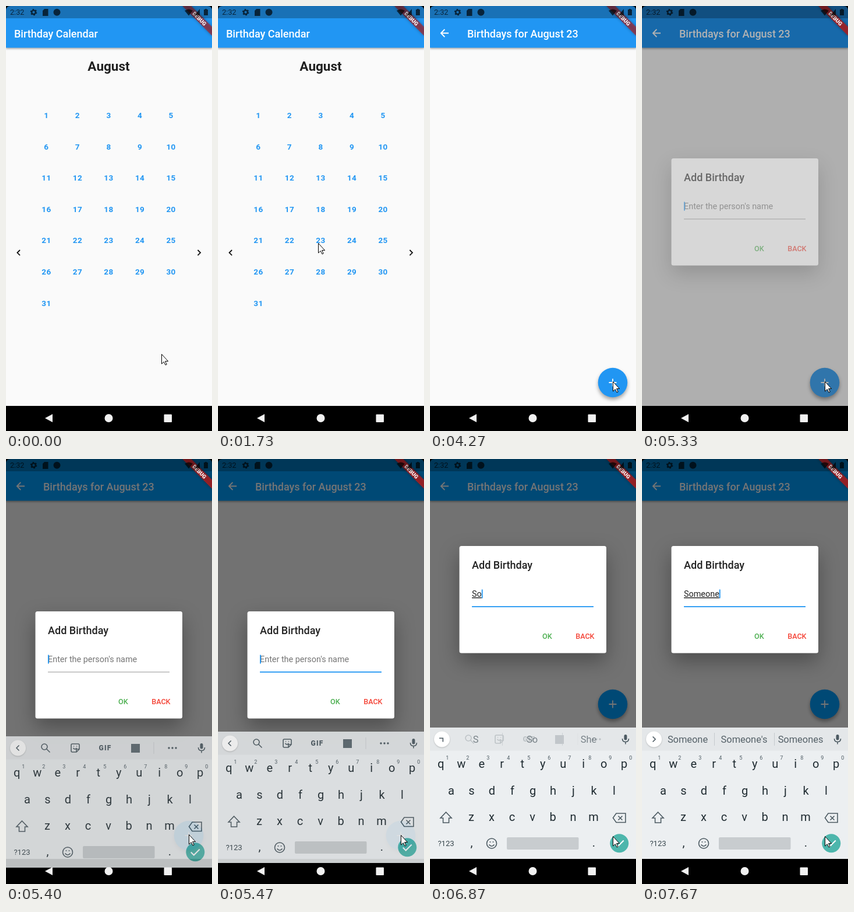
Animation of 354 by 728 pixels, one loop 8 s. Source, as an HTML page:

```html
<!DOCTYPE html>
<html lang="en">
<head>
<meta charset="utf-8">
<title>Birthday Calendar</title>
<style>
  html, body { margin: 0; width: 100%; height: 100%; overflow: hidden; background: #000; }
  svg { display: block; width: 100%; height: 100%; font-family: Roboto, sans-serif; }
  .mid { text-anchor: middle; }
  .title { font-size: 18px; font-weight: 500; }
  .button { font-size: 12.6px; font-weight: 500; }
  .line { fill: none; stroke-width: 1.8; }
  #days { font-size: 13.5px; font-weight: 700; letter-spacing: .4px; fill: #2196f3; }
  #fab { filter: drop-shadow(0 4px 3px rgba(0,0,0,.35)); }
  #dialog { filter: drop-shadow(0 14px 17px rgba(0,0,0,.32)); }
  #typed { text-decoration: underline 1px #777; text-underline-offset: 1.5px; }
  #keys { font-size: 20px; fill: #1f2b31; }
  #keyboard .line { stroke: #4c5a62; stroke-width: 1.6; }
  #words { font-size: 16.4px; fill: #556168; }
  .bar { filter: drop-shadow(0 2px 1.5px rgba(0,0,0,.3)); }
</style>
</head>
<body>
<svg viewBox="0 0 354 728">
  <defs><clipPath id="fabClip"><circle cx="314" cy="645" r="25.3"/></clipPath></defs>

  <g id="calendar">
    <rect width="354" height="685" fill="#fafafa"/>
    <rect class="bar" width="354" height="71.5" fill="#2196f3"/>
    <text class="title" x="14" y="53.5" fill="#fff">Birthday Calendar</text>
    <text class="mid" x="176.5" y="110.5" font-size="22.5" font-weight="700" fill="#212121">August</text>
    <g id="days" class="mid"></g>
    <path class="line" stroke="#111" d="M24 418l-4.6 4.6 4.6 4.6M329.5 418l4.6 4.6-4.6 4.6"/>
  </g>

  <g id="birthdays">
    <rect width="354" height="685" fill="#fafafa"/>
    <rect class="bar" width="354" height="71.5" fill="currentColor"/>
    <path class="line" stroke="#fff" d="M32 46.500H19M25.300 40l-6.500 6.500 6.500 6.500"/>
    <text class="title" x="64" y="53.5" fill="#fff">Birthdays for August 23</text>
    <g id="fab">
      <circle cx="314" cy="645" r="25.3" fill="currentColor"/>
      <circle id="splash" cx="314" cy="645" fill="#fff" fill-opacity=".16" clip-path="url(#fabClip)"/>
      <path class="line" stroke="#fff" d="M307.500 645h13M314 638.500v13"/>
    </g>
  </g>

  <rect id="dim" width="354" height="685"/>

  <g id="dialog">
    <rect x="50.5" y="149" width="252.500" height="183.500" rx="3.500" fill="#fff"/>
    <text class="title" x="72" y="188" fill="#212121">Add Birthday</text>
    <text id="hint" x="72" y="236" font-size="14.4" fill="#757575">Enter the person's name</text>
    <text id="typed" x="72" y="236" font-size="14.4" fill="#212121"></text>
    <rect id="caret" y="223.500" width="1.8" height="15" fill="#2196f3"/>
    <rect id="underline" x="72" y="252" width="209" height="1.8"/>
    <text class="button" x="193" y="307.500" fill="#4caf50">OK</text>
    <text class="button" x="250.200" y="307.500" fill="#f44336">BACK</text>
  </g>

  <g transform="translate(354) rotate(45)">
    <rect id="ribbon" x="-36" y="25.200" width="72" height="10.800" fill="#b71c1c"
      style="filter:drop-shadow(0 0 2.500px rgba(0,0,0,.5))"/>
    <text class="mid" y="33.900" font-size="9.2" font-weight="900" fill="#fff">DEBUG</text>
  </g>

  <g>
    <rect width="354" height="21" fill-opacity=".25"/>
    <g fill-opacity=".68">
      <text x="7" y="15" font-size="12.6">2:32</text>
      <path d="M66 5h6.500v12h-9.500v-9zM307 8q7-5 14 0l-7 8.500zM333 5v11h-9zM340 6h2v-1h3v1h2v10h-7z"/>
    </g>
    <g fill="none" stroke="#000" stroke-opacity=".68">
      <circle cx="47.500" cy="10.700" r="3.300" stroke-width="2.400"/>
      <circle cx="47.500" cy="10.700" r="5" stroke-width="1.600" stroke-dasharray="2.600 2.636"/>
    </g>
    <circle cx="87.500" cy="10.700" r="6" fill-opacity=".68"/>
  </g>

  <rect y="685" width="354" height="43"/>
  <path d="M0 0h8q-8 0-8 8zM354 0h-8q8 0 8 8z"/>
  <g fill="#f1f1f1">
    <path d="M67 706l13-7v14z"/>
    <circle cx="176.500" cy="706" r="7"/>
    <rect x="271.500" y="699.500" width="13.500" height="13.500" rx="1"/>
  </g>

  <g id="keyboard">
    <rect y="460" width="354" height="225" fill="#eceff1"/>
    <rect y="460" width="354" height="39.500" fill="#e4e7e9"/>
    <circle cx="20.500" cy="480" r="13.500" fill="#fff" style="filter:drop-shadow(0 1px 1px rgba(0,0,0,.2))"/>
    <path id="chevron" class="line" d="M22.500 475.500l-4.500 4.500 4.500 4.500"/>
    <g id="tools">
      <g class="line">
        <circle cx="66" cy="478" r="5"/>
        <path d="M69.500 481.500l6 6M114 473h10q2 0 2 2v7l-5 5h-7q-2 0-2-2v-10q0-2 2-2zM126 482h-5v5M115.500 480q3 4 6 0M116 477h1M121 477h1"/>
      </g>
      <text class="mid" x="170.500" y="484" font-size="12" font-weight="900" letter-spacing="1.2" fill="#4c5a62">GIF</text>
      <rect x="215" y="473" width="15" height="15" fill="#5b686f"/>
      <rect x="253.500" y="470" width="1" height="20" fill="#cbd0d3"/>
      <path d="M280 480h.01M286 480h.01M292 480h.01" stroke="#4c5a62" stroke-width="3.500" stroke-linecap="round"/>
    </g>
    <g id="words" class="mid">
      <text x="78.500" y="486"></text><text x="175.500" y="486"></text><text x="272.500" y="486"></text>
      <path d="M124.500 469v22M227.500 469v22" stroke="#c5cacd"/>
    </g>
    <rect x="333.500" y="472" width="5" height="9.500" rx="2.500" fill="#4c5a62"/>
    <path class="line" d="M330.500 479q0 5.500 5.500 5.500t5.500-5.500M336 484.500v4"/>
    <g id="keys" class="mid"></g>
    <path id="shift" class="line" d="M27.500 605l9.500 10h-4.500v8h-10v-8h-4.500z"/>
    <path class="line" d="M320 607h16v15.500h-16l-5.500-7.750zM323.500 611.500l7 7M330.500 611.500l-7 7"/>
    <text class="mid" x="27.500" y="663" font-size="13" fill="#37454c">?123</text>
    <g class="mid" font-size="20" fill="#1f2b31"><text x="71.500" y="664">,</text><text x="281.500" y="664">.</text></g>
    <circle class="line" cx="106" cy="658.500" r="8.500"/>
    <path class="line" d="M101.500 660.500q4.500 5.500 9 0M102.500 656h2M107.500 656h2"/>
    <rect x="132" y="648" width="123.500" height="21" rx="2" fill="#c8cccf"/>
    <circle cx="325.300" cy="658.300" r="16" fill="#4db6ac"/>
    <path class="line" style="stroke:#fff;stroke-width:2" d="M317.800 658.500l5 5 10-10"/>
  </g>

  <path id="pointer" d="M.5.500v16.500l3.800-3.500 2.700 5.500 2.200-1-2.600-5.500h5z" fill="#fff" stroke="#000"/>
</svg>

<script>
const $ = id => document.getElementById(id);
const LOOP = 8000, TICK = 1000 / 15;

function addText(parent, x, y, content, size) {
  const el = document.createElementNS('http://www.w3.org/2000/svg', 'text');
  el.setAttribute('x', x);
  el.setAttribute('y', y);
  if (size) el.setAttribute('font-size', size);
  el.textContent = content;
  parent.append(el);
  return el;
}

for (let i = 0; i < 31; i++) {
  addText($('days'), 69.4 + 53.55 * (i % 5), 192.2 + 53.55 * Math.floor(i / 5), i + 1);
}

const letters = [];
[['qwertyuiop', 18.7, 529], ['asdfghjkl', 36.5, 574.5], ['zxcvbnm', 71, 620]].forEach(([row, x, y], r) => {
  [...row].forEach((letter, i) => {
    letters.push([addText($('keys'), x + 35 * i, y, letter), letter]);
    if (!r) addText($('keys'), x + 11 + 35 * i, 515, (i + 1) % 10, 9).setAttribute('fill', '#4c5a62');
  });
});

// Everything below is timed in ticks of 1/15 s.
const route = [[0, 267, 596], [6, 267, 596], [18, 172, 418], [19, 172, 418], [26, 172, 406],
  [47, 172, 406], [64, 314, 643], [81, 314, 643], [84, 314, 646], [120, 314, 646]];
const typing = [[0, ''], [100, 'S'], [103, 'So'], [109, 'Som'], [112, 'Some'],
  [113, 'Someo'], [114, 'Someon'], [115, 'Someone']];
const suggestions = [[0, ''], [101, 'S So She'], [107, 'So Sorry Some'], [110, 'Some Something Somehow'],
  [113, 'Some Someone Someday'], [115, "Someone Someone's Someones"]];

const latest = (list, tick) => list.filter(([start]) => start <= tick).pop()[1];
const progress = (tick, from, length) => Math.min(1, Math.max(0, (tick - from) / length));
const ease = p => .15 * p + .85 * p * p * (3 - 2 * p);
const show = (id, on) => { $(id).style.display = on ? '' : 'none'; };
const opacity = (id, v) => { $(id).setAttribute('opacity', v); };
const move = (id, x, y) => $(id).setAttribute('transform', `translate(${x} ${y})`);

function drawPointer(tick) {
  const next = route.findIndex(([at]) => at > tick);
  const [t0, x0, y0] = route[next - 1], [t1, x1, y1] = route[next];
  const p = ease((tick - t0) / (t1 - t0));
  move('pointer', Math.round(x0 + (x1 - x0) * p), Math.round(y0 + (y1 - y0) * p));
}

function drawPage(tick) {
  show('birthdays', tick >= 37);
  opacity('birthdays', tick === 37 ? .6 : 1);
  move('birthdays', 0, tick === 37 ? 12 : 0);
  $('birthdays').style.color = tick >= 81 ? '#009fff' : '#2196f3';
  move('fab', 0, tick >= 83 ? -225 : 0);
  $('splash').setAttribute('r', tick < 72 || tick > 82 ? 0 : tick < 77 ? 16 : 26);
}

function drawDialog(tick) {
  const open = tick >= 80;
  show('dim', open);
  show('dialog', open);
  opacity('dim', tick === 80 ? .3 : .54);
  opacity('dialog', tick === 80 ? .5 : 1);
  move('dialog', 0, 112 * (1 - progress(tick, 82, 3)) ** 2);
  $('underline').setAttribute('fill', tick >= 82 ? '#2196f3' : '#c4c4c4');
  $('ribbon').setAttribute('fill-opacity', open ? .8 : .63);

  const text = latest(typing, tick);
  $('typed').textContent = text;
  show('hint', !text);
  show('caret', tick < 86 || tick >= 94);
  $('caret').setAttribute('x', 72 + (text ? $('typed').getComputedTextLength() : 0));
}

function drawKeyboard(tick) {
  show('keyboard', tick >= 81);
  const left = 1 - progress(tick, 81, 3);
  move('keyboard', 0, Math.round(15 * left * left));
  opacity('keyboard', 1 - .2 * left);

  const upper = tick >= 98 && tick < 101;
  for (const [el, letter] of letters) el.textContent = upper ? letter.toUpperCase() : letter;
  $('shift').style.fill = upper ? '#4c5a62' : 'none';

  const swap = progress(tick, 100, 4);
  opacity('tools', 1 - swap);
  opacity('words', swap);
  $('chevron').setAttribute('transform', `rotate(${180 * swap} 20.5 480)`);
  const parts = latest(suggestions, tick).split(' ');
  $('words').querySelectorAll('text').forEach((el, i) => { el.textContent = parts[i] || ''; });
}

function draw(time) {
  const tick = Math.floor((time % LOOP + 4) / TICK) % 120;
  drawPage(tick);
  drawDialog(tick);
  drawKeyboard(tick);
  drawPointer(tick);
}

const start = performance.now();
(function loop() {
  draw(performance.now() - start);
  requestAnimationFrame(loop);
})();
</script>
</body>
</html>
```
